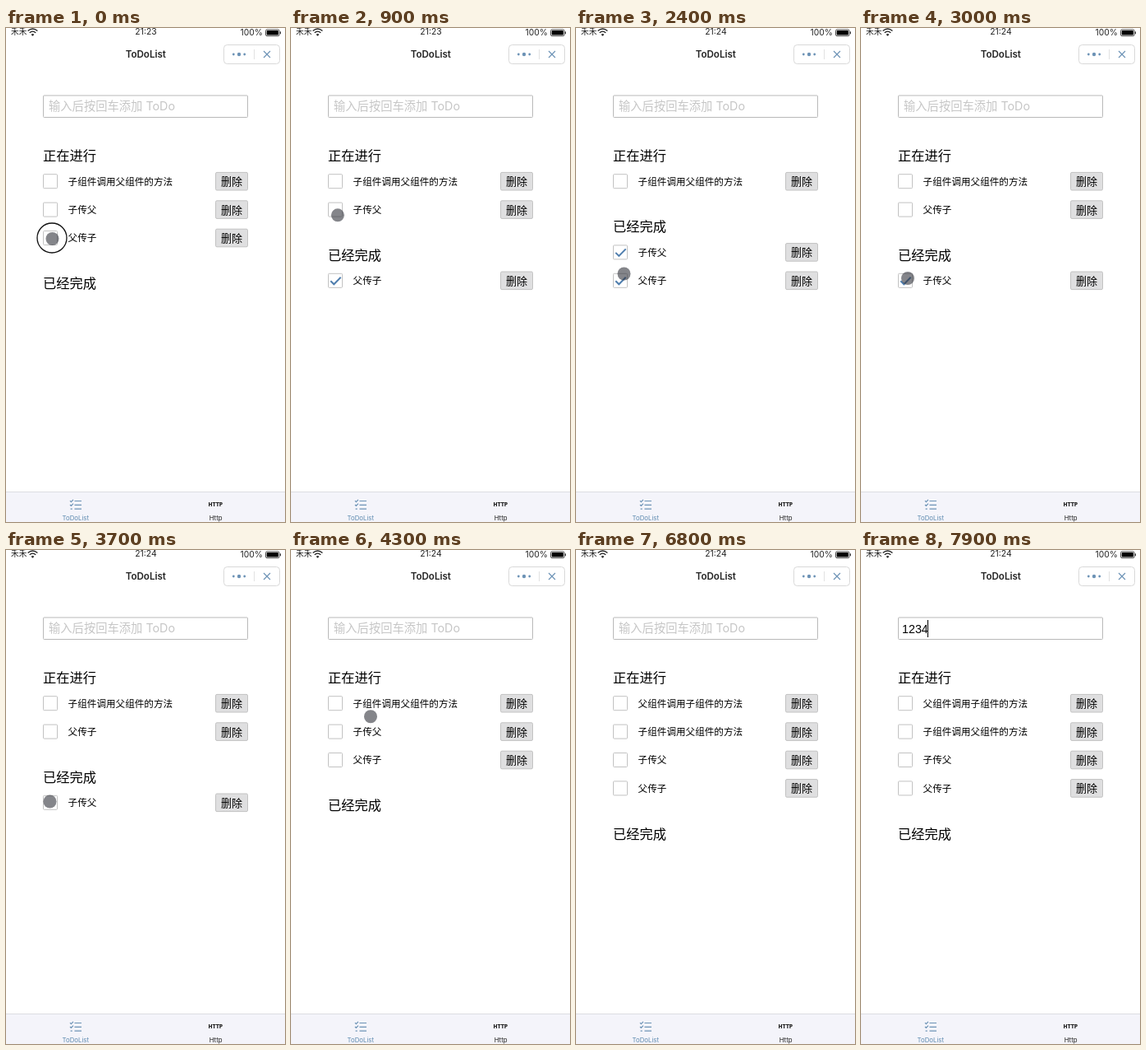
These frames come from a looping animation (340 by 600 pixels, 8000 ms). An HTML page:

```html
<!DOCTYPE html>
<html lang="zh-CN">
<head>
<meta charset="utf-8">
<title>ToDoList</title>
<style>
  html, body { margin: 0; width: 100%; height: 100%; overflow: hidden; background: #fff; }
  svg { display: block; width: 340px; height: 600px; }
  text { font-family: Inter, "Noto Sans CJK SC", "Noto Sans CJK", sans-serif; white-space: pre; }
  .line { fill: none; stroke: #6d93b6; stroke-width: 1.2; }
</style>
</head>
<body>
<svg viewBox="0 0 340 600">
  <!-- status bar -->
  <g fill="#222">
    <text x="6" y="8.4" font-size="9.7">禾禾</text>
    <text id="clock" x="170.5" y="8.2" font-size="10.4" text-anchor="middle"></text>
    <text x="285.5" y="9.2" font-size="10.3">100%</text>
    <g fill="none" stroke="#222" stroke-width="1.3">
      <path d="M26.6 3.6Q32.5 -1.6 38.4 3.6M28.7 5.8Q32.5 2.4 36.3 5.8"/>
      <path d="M30.9 7.9Q32.5 6.6 34.1 7.9L32.5 9.4Z" fill="#222" stroke-width=".5"/>
    </g>
    <rect x="316.5" y="1.9" width="16.6" height="7.8" rx="1.6" fill="none" stroke="#222" stroke-width=".8"/>
    <rect x="317.7" y="3.1" width="14.2" height="5.4" rx=".6" fill="#000"/>
    <rect x="333.8" y="4.3" width="1.1" height="3" rx=".5"/>
  </g>

  <!-- title bar -->
  <text x="170.3" y="36" font-size="11.6" font-weight="600" fill="#222" text-anchor="middle">ToDoList</text>
  <rect x="265.5" y="20.5" width="68" height="23" rx="4" fill="#fff" stroke="#d9d9d9"/>
  <path d="M302.5 26V38" stroke="#e2e2e2"/>
  <g fill="#6d93b6">
    <circle cx="277.3" cy="32" r="1.4"/>
    <circle cx="284" cy="32" r="2.2"/>
    <circle cx="290.7" cy="32" r="1.4"/>
  </g>
  <path class="line" d="M314 28L322 36M322 28L314 36"/>

  <rect x="45.5" y="82" width="249" height="26.5" rx="1" fill="#fff" stroke="#b9b9b9"/>
  <g id="view"></g>

  <!-- tab bar -->
  <rect y="563" width="340" height="37" fill="#f4f4fa"/>
  <path d="M0 563.5H340" stroke="#dcdde2"/>
  <path class="line" stroke-width="1.3" d="M83.5 574.5H92M83.5 579.3H92M83.5 584.1H92M78 574.2L79.4 575.6L82 572.8M78 579L79.4 580.4L82 577.6M78.6 584.1H80.8"/>
  <text x="84.8" y="597.8" font-size="7.8" fill="#5f8bb0" text-anchor="middle">ToDoList</text>
  <text x="255.4" y="581" font-size="6.2" font-weight="900" fill="#222" text-anchor="middle">HTTP</text>
  <text x="255.6" y="597.8" font-size="7.8" fill="#222" text-anchor="middle">Http</text>

  <g id="pointer">
    <circle id="ring" r="18" cx="-.5" cy="-1" fill="none" stroke="#111" stroke-width="1.3"/>
    <circle r="8" fill="rgba(50,52,60,.6)"/>
  </g>
</svg>
<script>
const $ = id => document.getElementById(id);
const LOOP = 8000, STEP = 100, ROW = 34.4;
const pasted = '父组件调用子组件的方法';

// check and move give the [from, to) times of the tick and of the stay in the done list
const items = [
  { name: pasted, born: 6300 },
  { name: '子组件调用父组件的方法' },
  { name: '子传父', check: [1700, 3700], move: [2000, 4000] },
  { name: '父传子', check: [100, 2700], move: [600, 3000] }
];
const path = [
  [0, 56.5, 256], [600, 56.5, 256], [1000, 57, 222], [1200, 57, 222], [1500, 57, 218],
  [2000, 57, 218], [2400, 58.5, 298.5], [2600, 57, 304], [3000, 57, 304],
  [3500, 53.5, 305.5], [4000, 53.5, 305.5], [4600, 140.5, 99], [LOOP, 140.5, 99]
];
const clicks = [0, 1600, 2600, 3600, 4700];
const keys = [7500, 7600, 7800, 7900];

const during = (t, span) => !!span && t >= span[0] && t < span[1];

// y is the middle of the line of characters
const label = (s, x, y, size, fill = '#000') =>
  `<text x="${x}" y="${y + size * .38}" font-size="${size}" fill="${fill}">${s}</text>`;

function row(item, y, t) {
  const tick = during(t, item.check)
    ? `<path d="M48.3 ${y + .5}L52.3 ${y + 4.5}L60.7 ${y - 4}" fill="none" stroke="#4f7eae" stroke-width="2"/>` : '';
  return `<rect x="45.5" y="${y - 8.5}" width="17" height="17" rx="1" fill="#fff" stroke="#c2c2c2"/>` + tick +
    label(item.name, 75.6, y, 11.6) +
    `<rect x="255.5" y="${y - 10.8}" width="39" height="21.6" rx="1.5" fill="#dfdfe0" stroke="#c2c2c2"/>` +
    label('删除', 262, y, 13);
}

function list(t) {
  const shown = items.filter(i => t >= (i.born || 0));
  const done = shown.filter(i => during(t, i.move));
  const open = shown.filter(i => !during(t, i.move));
  const group = (title, rows, y) =>
    label(title, 45, y, 16.3) + rows.map((r, i) => row(r, y + 31.2 + i * ROW, t)).join('');
  return group('正在进行', open, 155) + group('已经完成', done, 206.8 + open.length * ROW);
}

function field(t) {
  const count = keys.filter(k => t >= k).length;
  const value = during(t, [5400, 6300]) ? pasted : '1234'.slice(0, count);
  const size = 14.3;
  const width = count ? count * size * .556 - .8 : value.length * size;
  const caret = [[4800, 5300], [5400, 5800], [6300, 6800], [7200, LOOP]].some(s => during(t, s));
  const text = !value ? label('输入后按回车添加 ToDo', 52, 95, size, '#c6c6c6')
    : count ? `<text x="50" y="101" font-size="${size}" style="font-family:'Liberation Sans',sans-serif">${value}</text>`
    : label(value, 50, 95, size);
  return text + (caret ? `<rect x="${Math.round(50 + width)}" y="85" width="1" height="21"/>` : '');
}

function pointer(t) {
  const i = path.findIndex(p => p[0] > t);
  const [t0, x0, y0] = path[i - 1], [t1, x1, y1] = path[i];
  const u = (t - t0) / (t1 - t0), e = u * u * (3 - 2 * u);
  $('pointer').setAttribute('transform', `translate(${x0 + (x1 - x0) * e} ${y0 + (y1 - y0) * e})`);
  $('pointer').style.display = t < 5400 ? '' : 'none';
  $('ring').style.display = clicks.some(c => during(t, [c, c + STEP])) ? '' : 'none';
}

let last = -1;
function draw() {
  const t = Math.floor(performance.now() % LOOP / STEP) * STEP;
  if (t !== last) {
    last = t;
    $('clock').textContent = t < 2000 ? '21:23' : '21:24';
    $('view').innerHTML = field(t) + list(t);
    pointer(t);
  }
  requestAnimationFrame(draw);
}
draw();
</script>
</body>
</html>
```
